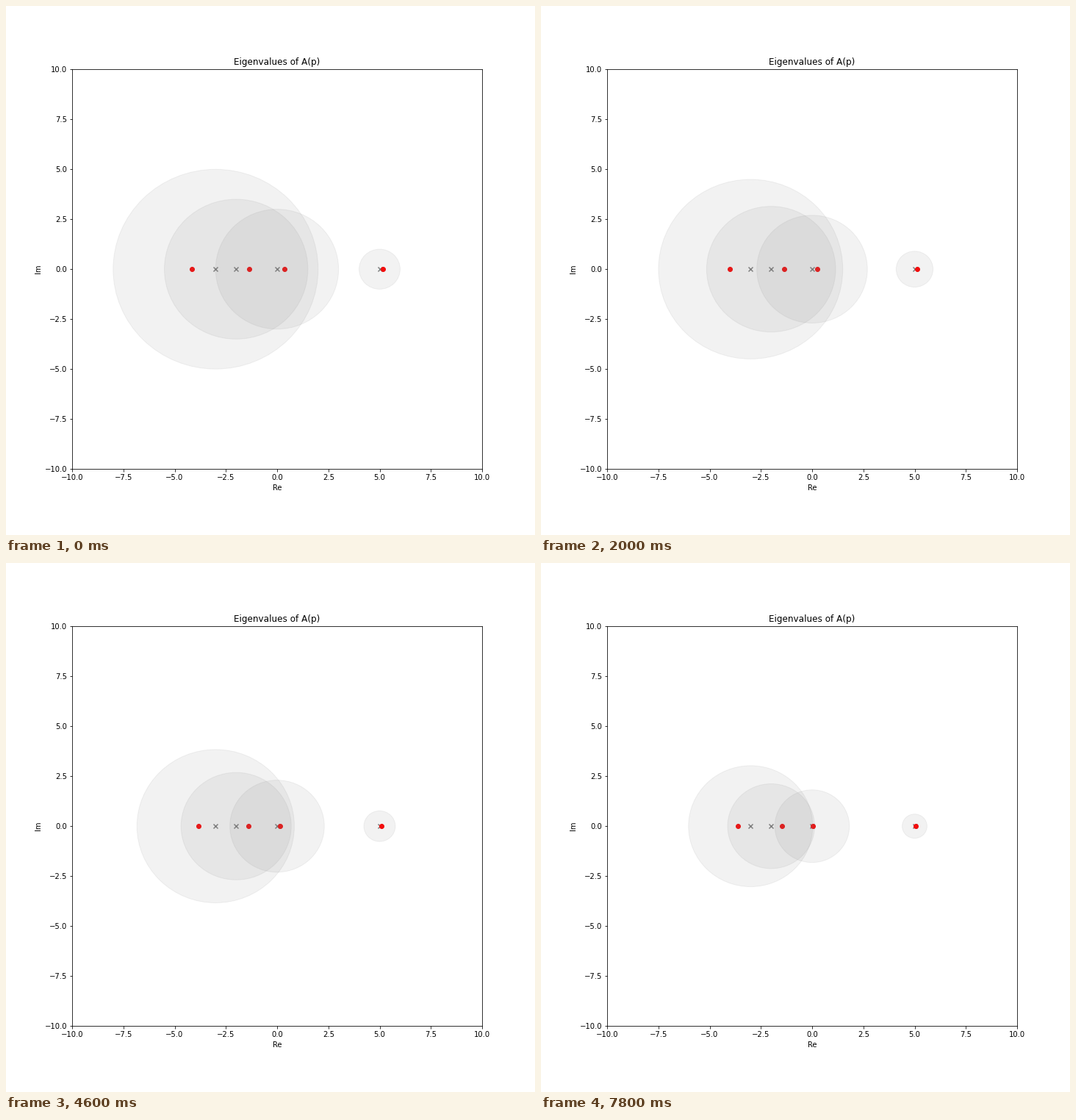
These frames come from a looping animation (720 by 720 pixels, 8 s). A matplotlib script:

```python
import numpy as np
import matplotlib.pyplot as plt
from matplotlib.animation import FuncAnimation
from matplotlib.patches import Circle

FRAMES = 40
INTERVAL = 200
STEPS = 99  # steps for p to run from 1 down to 0

A = np.array([
    [5.0, 0.0, 0.0, -1.0],
    [1.0, 0.0, -1.0, 1.0],
    [-1.5, 1.0, -2.0, 1.0],
    [-1.0, 1.0, 3.0, -3.0],
])
centers = np.diag(A)
off_diag = A - np.diag(centers)
radii = np.abs(off_diag).sum(axis=1)

plt.rcParams["font.family"] = "DejaVu Sans"
fig = plt.figure(figsize=(10, 10), dpi=72, facecolor="white")
ax = fig.add_axes([0.125, 0.125, 0.775, 0.755])
ax.set(xlim=(-10, 10), ylim=(-10, 10), xlabel="Re", ylabel="Im",
       title="Eigenvalues of A(p)")
ticks = np.arange(-10, 10.1, 2.5)
ax.set_xticks(ticks)
ax.set_yticks(ticks)

# The translucent discs lie over the markers and tint them slightly.
ax.scatter(centers, np.zeros(4), marker="x", color="gray", zorder=1)
dots = ax.scatter(np.zeros(4), np.zeros(4), color="red", zorder=1.1)
discs = [ax.add_patch(Circle((c, 0), r, color="gray", alpha=0.1, zorder=1.2))
         for c, r in zip(centers, radii)]


def update(i):
    p = 1 - i / STEPS
    eig = np.linalg.eigvals(np.diag(centers) + p * off_diag)
    dots.set_offsets(np.column_stack([eig.real, eig.imag]))
    for disc, r in zip(discs, radii):
        disc.set_radius(p * r)
    return [dots, *discs]


anim = FuncAnimation(fig, update, frames=FRAMES, interval=INTERVAL,
                     repeat=True, repeat_delay=0)
plt.show()
```
